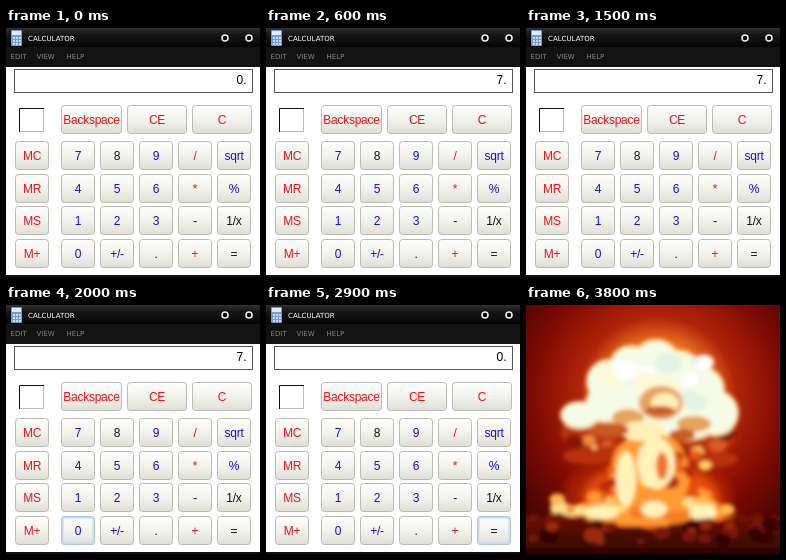
Animation of 254x249 px, one loop 4.8 s. Source, as an HTML page:

```html
<!DOCTYPE html>
<html lang="en">
<head>
<meta charset="utf-8">
<title>Calculator</title>
<style>
html, body { margin: 0; width: 100%; height: 100%; overflow: hidden; background: #fff; }
svg { display: block; width: 254px; height: 249px; }
text { font: 12px "Liberation Sans", Arial, sans-serif; letter-spacing: -.25px; }
.small { font: 7px "DejaVu Sans", sans-serif; letter-spacing: 0; }
.mid { text-anchor: middle; }
</style>
</head>
<body>
<svg id="stage" viewBox="0 0 254 249">
  <defs>
    <linearGradient id="bar" x2="0" y2="1">
      <stop stop-color="#303030"/><stop offset=".35" stop-color="#161616"/><stop offset="1" stop-color="#050505"/>
    </linearGradient>
    <linearGradient id="normal" x2="0" y2="1">
      <stop stop-color="#fefefd"/><stop offset=".55" stop-color="#f1f1ec"/><stop offset="1" stop-color="#dfded5"/>
    </linearGradient>
    <linearGradient id="pressed" x2="0" y2="1">
      <stop stop-color="#d3d2c9"/><stop offset="1" stop-color="#eeede7"/>
    </linearGradient>
    <radialGradient id="sky" gradientUnits="userSpaceOnUse" cx="132" cy="90" r="178">
      <stop offset=".2" stop-color="#ffb84e"/><stop offset=".32" stop-color="#e4641c"/>
      <stop offset=".44" stop-color="#b02409"/><stop offset=".68" stop-color="#820c03"/>
      <stop offset="1" stop-color="#420201"/>
    </radialGradient>
    <linearGradient id="ground" x2="0" y2="1">
      <stop stop-color="#7c1606"/><stop offset=".5" stop-color="#430903"/><stop offset="1" stop-color="#270302"/>
    </linearGradient>
    <filter id="soft" x="-20%" y="-20%" width="140%" height="140%"><feGaussianBlur stdDeviation="2"/></filter>
    <filter id="softer" x="-20%" y="-20%" width="140%" height="140%"><feGaussianBlur stdDeviation="5"/></filter>
  </defs>
  <g id="calc">
    <rect width="254" height="249" fill="#fff"/>
    <rect width="254" height="39" fill="#121212"/>
    <rect width="254" height="19" fill="url(#bar)"/>
    <rect y="247" width="254" height="2" fill="#111"/>
    <rect x="5" y="2" width="11" height="16" rx="1" fill="#6f9bd8"/>
    <rect x="6" y="3" width="9" height="4" fill="#d9ebff"/>
    <path d="M7 10h8M7 13h8M7 16h8" stroke="#e8f1ff" stroke-width="1.6" stroke-dasharray="2 1"/>
    <g fill="#000" stroke="#eee" stroke-width="1.6"><circle cx="219" cy="10" r="3"/><circle cx="243" cy="10" r="3"/></g>
    <text class="small" x="22" y="13" fill="#fff">CALCULATOR</text>
    <g fill="#858585">
      <text class="small" x="4.5" y="31">EDIT</text>
      <text class="small" x="30.5" y="31">VIEW</text>
      <text class="small" x="60.5" y="31">HELP</text>
    </g>
    <rect x="8.5" y="41.5" width="238" height="23" fill="#fff" stroke="#555"/>
    <text id="display" y="56"></text>
    <path d="M13.5 104V80.5H38" fill="none" stroke="#111"/>
    <path d="M14 103.5H37.5V81" fill="none" stroke="#bbb"/>
  </g>
  <g id="blast"></g>
</svg>
<script>
const get = id => document.getElementById(id);
const calc = get('calc'), blast = get('blast'), display = get('display');
const RED = '#f01414', BLUE = '#1010e8', DARK = '#151515';

function add(parent, tag, attrs, text = '') {
  const node = document.createElementNS('http://www.w3.org/2000/svg', tag);
  for (const key in attrs) node.setAttribute(key, attrs[key]);
  node.textContent = text;
  return parent.appendChild(node);
}

// Calculator keys
const faces = {};
function key(label, x, y, width, color) {
  const glow = add(calc, 'rect', {x: x + 1.5, y: y + 1.5, width: width - 3, height: 26, rx: 2, fill: 'none', 'stroke-width': 2});
  const face = add(calc, 'rect', {x: x + .5, y: y + .5, width: width - 1, height: 28, rx: 3});
  calc.insertBefore(face, glow);
  add(calc, 'text', {class: 'mid', x: x + width / 2, y: y + 19, fill: color}, label);
  faces[label] = {face, glow};
}
function setKey(label, state) {
  const {face, glow} = faces[label];
  face.setAttribute('fill', state === 'pressed' ? 'url(#pressed)' : 'url(#normal)');
  face.setAttribute('stroke', {normal: '#bcbbb2', hover: '#94b4dc', pressed: '#96958d'}[state]);
  glow.setAttribute('stroke', state === 'hover' ? '#c3d9f4' : 'none');
}
['Backspace', 'CE', 'C'].forEach((label, i) => key(label, [55, 121, 186][i], 77, [61, 60, 60][i], RED));
const rows = ['MC 7 8 9 / sqrt', 'MR 4 5 6 * %', 'MS 1 2 3 - 1/x', 'M+ 0 +/- . + ='];
rows.forEach((row, r) => row.split(' ').forEach((label, c) => {
  const color = /^(M.|[/*+])$/.test(label) ? RED : ['8', '-', '1/x', '.', '='].includes(label) ? DARK : BLUE;
  key(label, c ? 16 + 39 * c : 9, [113, 146, 178, 211][r], 34, color);
}));

// Soft fireball with a billowing cap, glowing stem and dark ground
let seed = 11;
const random = () => (seed = seed * 16807 % 2147483647) / 2147483647;
function puffs(parent, fill, list) {
  list.forEach(([cx, cy, rx, ry = rx]) => add(parent, 'ellipse', {cx, cy, rx, ry, fill}));
}
function scatter(parent, count, x, y, w, h, size, colors) {
  for (let i = 0; i < count; i++) {
    const r = size * (.5 + random());
    puffs(parent, colors[i % colors.length], [[x + w * random(), y + h * random(), r, r * .75]]);
  }
}
add(blast, 'rect', {width: 254, height: 249, fill: 'url(#sky)'});
const far = add(blast, 'g', {filter: 'url(#softer)'});
puffs(far, '#a51b06', [[126, 130, 86, 34], [122, 190, 84, 42]]);
puffs(far, '#e64b0c', [[125, 193, 68, 35], [118, 218, 94, 16]]);
const near = add(blast, 'g', {filter: 'url(#soft)'});
puffs(near, '#b93210', [[66, 127, 31, 18], [178, 132, 32, 16], [64, 151, 27, 8], [187, 154, 25, 8]]);
scatter(near, 24, 48, 112, 152, 38, 7, ['#d95b22', '#871305', '#f18a3f']);
puffs(near, '#ff9a30', [[124, 170, 40, 45], [122, 207, 82, 14]]);
scatter(near, 42, 66, 140, 114, 66, 6, ['#ffcf66', '#e95b13', '#ff9a34', '#b72b08']);
scatter(near, 24, 30, 194, 174, 20, 6, ['#ffe08a', '#f77c21', '#ffb84c']);
puffs(near, '#fff3b8', [[130, 158, 19, 26], [100, 174, 10, 28], [128, 204, 13, 8], [177, 207, 14, 8], [76, 207, 17, 7]]);
puffs(near, '#f0752a', [[136, 161, 6, 14]]);
const lobes = [[83, 77, 21], [105, 62, 20], [130, 58, 22], [153, 69, 22], [175, 85, 22], [190, 108, 21],
  [78, 99, 17], [54, 110, 18, 12], [115, 94, 43, 30], [160, 107, 36, 27]];
puffs(near, '#ffdf91', lobes.map(([x, y, rx, ry = rx]) => [x, y, rx + 2, ry + 2]));
puffs(near, '#f5fbe5', lobes);
scatter(near, 24, 76, 51, 108, 56, 9, ['#ffffff', '#e1f2e6', '#fff8d7']);
puffs(near, '#e6a35b', [[135, 98, 22, 17], [102, 113, 16, 9], [168, 119, 17, 8]]);
puffs(near, '#fff0b8', [[139, 98, 14, 10], [116, 126, 22, 10]]);
puffs(near, '#c85a24', [[134, 106, 15, 5], [83, 125, 20, 7], [156, 130, 13, 6]]);
let ridge = 'M-8 260V210';
for (let x = 0; x <= 264; x += 8) ridge += `L${x} ${213 + 6 * Math.cos((x - 128) / 34) + 7 * random()}`;
add(near, 'path', {d: ridge + 'V260Z', fill: 'url(#ground)'});
scatter(near, 24, 0, 219, 254, 20, 7, ['#78180a', '#350603', '#9b2a0d']);

// Clicks: hover for 200 ms, then pressed for 200 ms
const clicks = [[200, '7'], [1100, '/'], [2000, '0'], [2900, '=']];
function draw(now) {
  const t = now % 4800;
  for (const [start, label] of clicks) {
    const age = t - start;
    setKey(label, age < 0 || age >= 400 ? 'normal' : age < 200 ? 'hover' : 'pressed');
  }
  const value = t < 600 ? '0.' : t < 2400 ? '7.' : t < 3300 ? '0.' : 'OH SHI-';
  const long = value.length > 2;
  display.textContent = value;
  display.setAttribute('x', long ? 203 : 230.5);
  display.style.letterSpacing = long ? '-.7px' : '0';
  blast.style.display = t < 3800 ? 'none' : '';
  requestAnimationFrame(draw);
}
Object.keys(faces).forEach(label => setKey(label, 'normal'));
draw(performance.now());
</script>
</body>
</html>
```
